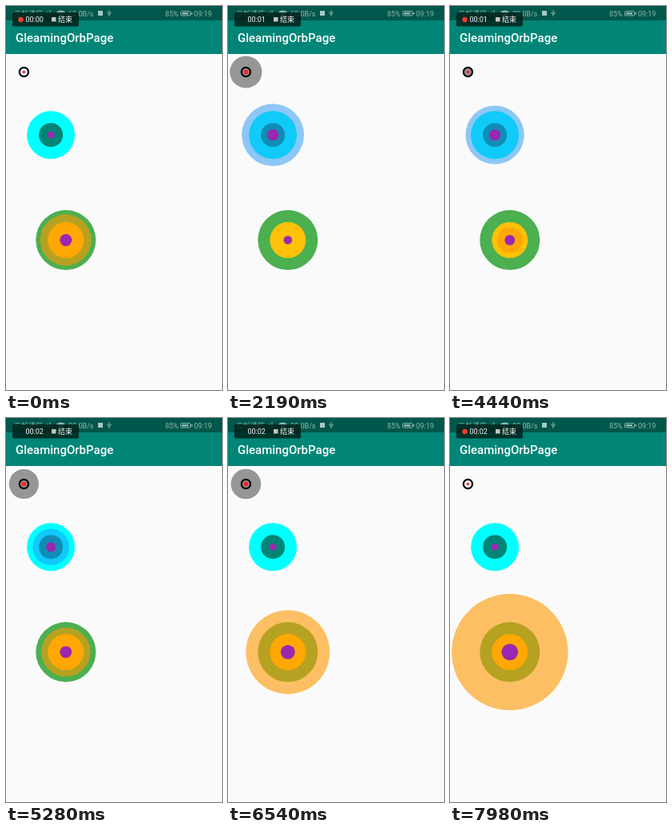
These frames come from a looping animation (270x480 px, 8 s). An HTML page:

```html
<!DOCTYPE html>
<html lang="zh">
<head>
<meta charset="utf-8">
<title>Breathing circles</title>
<style>
  html, body { margin: 0; width: 100%; height: 100%; overflow: hidden; background: #fafafa; }
  svg { display: block; width: 100%; height: 100%; }
  text { font-family: Roboto, "Noto Sans CJK SC", "Noto Sans CJK", sans-serif; }
  .status { font-size: 9px; fill: #8fb8b1; stroke: none; }
  .line { fill: none; stroke: #8fb8b1; }
  .pill { font-size: 9px; fill: #f6f8f6; }
</style>
</head>
<body>
<svg viewBox="0 0 270 480">
  <rect width="270" height="480" fill="#fafafa"/>
  <g id="views"></g>

  <rect width="270" height="60" fill="#008577"/>
  <rect width="270" height="18" fill="#00574b"/>
  <text x="12" y="45" font-size="15" font-weight="500" fill="#fff">GleamingOrbPage</text>

  <g class="status">
    <text x="10" y="12.5">云杉通信</text>
    <path class="line" d="M49 12V9M52 12V7M55 12V5"/>
    <path d="M63 7.5Q68.5 3.5 74 7.5L68.5 13Z"/>
    <text id="speed" x="78" y="12.5"></text>
    <rect x="115" y="6" width="6" height="6" fill="#a9c8c3"/>
    <path class="line" d="M129 5v8M127 7.5v1.5l2 1.5 2-1.5v-1.5"/>
    <text x="199" y="12.5">85%</text>
    <rect class="line" x="218.5" y="6.5" width="12" height="5.5" rx="1"/>
    <path d="M220 8h8v2.5h-8zM231.5 8h1.5v2.5h-1.5z"/>
    <text x="235" y="12.5">09:19</text>
  </g>

  <rect x="8" y="8" width="83" height="17.5" rx="2" fill="#02241c" opacity=".86"/>
  <circle id="rec" cx="18.5" cy="17" r="3.2" fill="#f93a2c"/>
  <text id="clock" class="pill" x="24.5" y="20"></text>
  <rect x="57" y="14" width="5.5" height="5.5" fill="#c2c8bb"/>
  <text class="pill" x="65" y="20">结束</text>
</svg>
<script>
const LOOP = 8000, TICK = 3800, FIRST_TICK = 950;
const CORE_GROWTH = 0.07;
const byId = id => document.getElementById(id);

// Breath shapes over u = 0..1, both rising to 1 in the middle
const swell = u => Math.sin(Math.PI * u) ** 1.1;
const ramp = u => 1 - Math.abs(2 * u - 1);

const views = [
  {
    x: 22.4, y: 82.5, discs: [], ring: true,
    halo: '#000', alpha: 0.4, core: '#f3262c', rest: 1.7,
    wave: swell, max: 22.3, start: -100, length: 3600, period: 4220
  },
  {
    x: 56.1, y: 161.2, discs: [[30, '#0ff'], [15, '#008577']],
    halo: '#2196f3', alpha: 0.5, core: '#9c27b0', rest: 4.4,
    wave: swell, max: 45, start: 0, length: 6450, period: 8000
  },
  {
    x: 74.8, y: 292.6, discs: [[37.5, '#4caf50'], [22.5, '#ffc107']],
    halo: '#ff9800', alpha: 0.6, core: '#9c27b0', rest: 5.3,
    wave: ramp, max: 75, start: 3500, length: 8700, period: 10340
  }
];

function add(v, r, fill, extra = {}) {
  const el = document.createElementNS('http://www.w3.org/2000/svg', 'circle');
  const attrs = { cx: v.x, cy: v.y, r, fill, ...extra };
  for (const name in attrs) el.setAttribute(name, attrs[name]);
  return byId('views').appendChild(el);
}

for (const v of views) {
  v.discs.forEach(([r, fill]) => add(v, r, fill));
  v.haloEl = add(v, 0, v.halo, { 'fill-opacity': v.alpha });
  if (v.ring) add(v, 5.6, 'none', { stroke: '#000', 'stroke-width': 2.2 });
  v.coreEl = add(v, 0, v.core);
}

// Each breath is followed by a rest until the period ends
function haloRadius(v, t) {
  const age = (t - v.start + v.period) % v.period;
  return age < v.length ? v.max * v.wave(age / v.length) : 0;
}

function draw(t) {
  for (const v of views) {
    const r = haloRadius(v, t);
    v.haloEl.setAttribute('r', r);
    v.coreEl.setAttribute('r', v.rest + CORE_GROWTH * r);
  }
  const ticks = (t - FIRST_TICK + TICK) / TICK;
  byId('clock').textContent = '00:0' + Math.floor(ticks);
  byId('rec').style.visibility = ticks % 1 < 0.5 ? 'hidden' : 'visible';
  byId('speed').textContent = (t < 2700 ? '60' : '00') + '.0B/s';
}

const start = performance.now();
function frame() {
  draw((performance.now() - start) % LOOP);
  requestAnimationFrame(frame);
}
frame();
</script>
</body>
</html>
```
